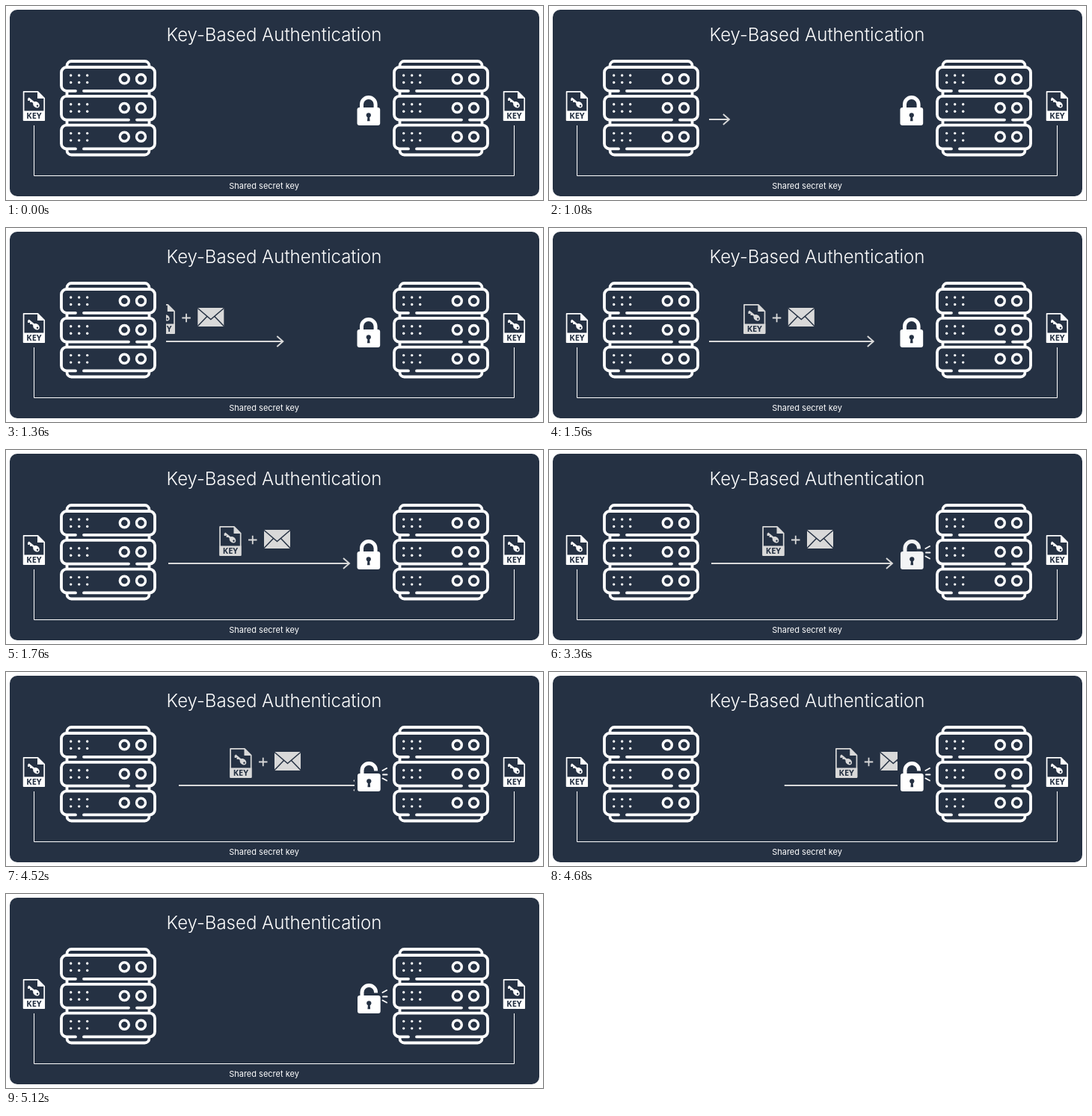
Animation, 718 px wide and 260 px high, one loop 6080 ms. Source, as an HTML page:

```html
<!DOCTYPE html>
<html lang="en">
<head>
<meta charset="utf-8">
<title>Key-Based Authentication</title>
<style>
  html, body { margin: 0; height: 100%; overflow: hidden; background: #fff; }
  svg { display: block; --navy: #253143; }
  text { font-family: Inter, sans-serif; text-anchor: middle; }
  .line { fill: none; stroke: currentColor; }
  .solid { fill: currentColor; }
  .cut { fill: var(--navy); }
  .round { stroke-linecap: round; stroke-linejoin: round; }
</style>
</head>
<body>
<svg width="718" height="260" viewBox="0 0 718 260" color="#fff">
  <defs>
    <g id="panel">
      <circle cx="86.7" cy="93" r="1.7" class="solid"/>
      <circle cx="97.7" cy="93" r="1.7" class="solid"/>
      <circle cx="108.7" cy="93" r="1.7" class="solid"/>
      <circle cx="86.7" cy="102.5" r="1.7" class="solid"/>
      <circle cx="97.7" cy="102.5" r="1.7" class="solid"/>
      <circle cx="108.7" cy="102.5" r="1.7" class="solid"/>
      <g class="line" stroke-width="3.4">
        <circle cx="158.3" cy="97.7" r="6"/>
        <circle cx="180.5" cy="97.7" r="6"/>
      </g>
    </g>
    <path id="gapLeft" d="M104 113.8H192a7 7 0 0 0 7-7V89a7 7 0 0 0-7-7H81a7 7 0 0 0-7 7V106.800a7 7 0 0 0 7 7H93"/>
    <path id="gapRight" d="M175 113.800H192a7 7 0 0 0 7-7V89a7 7 0 0 0-7-7H81a7 7 0 0 0-7 7V106.800a7 7 0 0 0 7 7H164"/>
    <g id="server">
      <g class="line round" stroke-width="3.8">
        <use href="#gapLeft"/>
        <use href="#gapRight" y="38.800"/>
        <use href="#gapLeft" y="77.600"/>
        <path d="M81.500 81v-1a6 6 0 0 1 6-6h98a6 6 0 0 1 6 6v1M81.500 115v5M191.500 115v5M81.500 153.500v5M191.500 153.500v5M81.500 192v1.500a6 6 0 0 0 6 6h98a6 6 0 0 0 6-6V192"/>
      </g>
      <use href="#panel"/>
      <use href="#panel" y="38.800"/>
      <use href="#panel" y="77.600"/>
    </g>

    <g id="keyFile">
      <path d="M23.600 114.900H42.500L51.200 123.600V153H23.600z" class="line" stroke-width="1.700" stroke-linejoin="round"/>
      <path d="M42 114.500V124H51.500zM23 140.500H52V152.500a1.500 1.500 0 0 1-1.500 1.500H24.500a1.500 1.500 0 0 1-1.500-1.500z" class="solid"/>
      <path d="M30 123.300L38.500 130.500M30.300 123.800v3.200M33.300 126.300v2.600" class="line" stroke-width="2.300"/>
      <ellipse cx="40.500" cy="132.300" rx="4.800" ry="3.700" transform="rotate(42 40.500 132.300)" class="solid"/>
      <circle cx="42" cy="133.700" r="1.200" class="cut"/>
      <text x="37.500" y="151.200" class="cut" style="font: 700 11px 'Open Sans', sans-serif">KEY</text>
    </g>

    <g id="lockBody">
      <rect x="469.500" y="136" width="30.700" height="24" rx="3" class="solid"/>
      <circle cx="484.800" cy="146.300" r="3.100" class="cut"/>
      <path d="M483.600 147h2.400l.6 7.300h-3.600z" class="cut"/>
    </g>
  </defs>

  <rect x="5" y="5" width="708" height="250" rx="10" class="cut"/>
  <text x="358.500" y="47" font-size="24" font-weight="300" class="solid">Key-Based Authentication</text>
  <text x="345" y="245" font-size="11" class="solid">Shared secret key</text>
  <path d="M37.500 160V227.500H679.500V160" class="line"/>

  <use href="#server"/>
  <use href="#server" x="445"/>
  <use href="#keyFile"/>
  <use href="#keyFile" x="642"/>

  <clipPath id="channel"><rect x="214" y="95" width="252" height="70"/></clipPath>
  <g clip-path="url(#channel)">
    <g id="message" color="#d9d9d9">
      <use href="#keyFile" x="262.500" y="-12"/>
      <path d="M324 120.500h11.500M329.750 114.700v11.600" class="line" stroke-width="1.800"/>
      <rect x="345" y="107" width="35" height="25" rx="1" class="solid"/>
      <path d="M345 107.500L362.500 122.500L380 107.500M345 131.500L357.500 118.500M380 131.500L367.500 118.500" fill="none" stroke="var(--navy)" stroke-width="1.500"/>
      <path d="M217 152H459M451 145L459 152L451 159" class="line" stroke-width="1.900"/>
    </g>
  </g>

  <g id="closedLock">
    <use href="#lockBody"/>
    <path d="M475.500 138V131.800a9.300 9.300 0 0 1 18.600 0V138" class="line" stroke-width="5"/>
  </g>
  <g id="openLock">
    <use href="#lockBody" x=".5"/>
    <path d="M476 138V131.800a9.300 9.300 0 0 1 18.600 0V132.500" class="line" stroke-width="5"/>
    <path d="M503.500 132L509 129M504 137.500H509.500M503.500 142.500L509 145.500" class="line round" stroke-width="1.900"/>
  </g>
</svg>
<script>
  const LOOP = 6080, STEP = 40, DURATION = 750, TRAVEL = 263;
  const [message, closedLock, openLock] =
    ['message', 'closedLock', 'openLock'].map(id => document.getElementById(id));

  // cubic-bezier(0, 0, .58, 1)
  function easeOut(x) {
    let low = 0, high = 1;
    for (let i = 0; i < 24; i++) {
      const s = (low + high) / 2;
      if (1.74 * s * s * (1 - s) + s ** 3 < x) low = s; else high = s;
    }
    return low * low * (3 - 2 * low);
  }

  const progress = (time, start) =>
    easeOut(Math.min(1, Math.max(0, (time - start) / DURATION)));

  function draw(now) {
    const time = Math.floor((now % LOOP) / STEP) * STEP;
    const shift = TRAVEL * (progress(time, 1000) - 1 + progress(time, 4496));
    const unlocked = progress(time, 2750);
    message.setAttribute('transform', `translate(${shift.toFixed(2)} 0)`);
    message.style.visibility = time < 1040 || time >= 5120 ? 'hidden' : 'visible';
    closedLock.style.opacity = 1 - unlocked;
    openLock.style.opacity = unlocked;
  }

  const origin = performance.now();
  function tick() {
    draw(performance.now() - origin);
    requestAnimationFrame(tick);
  }
  tick();
</script>
</body>
</html>
```
